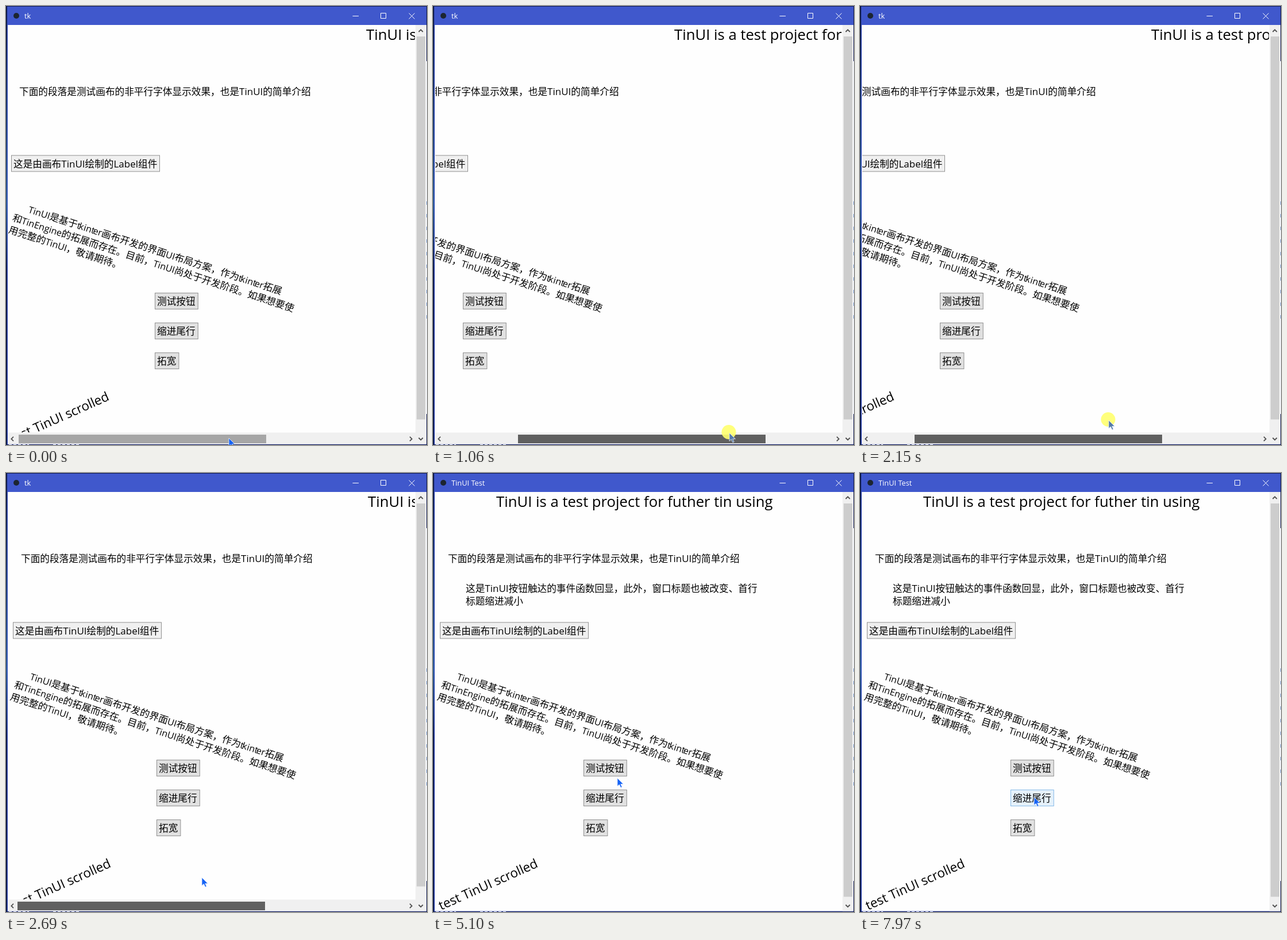
Recreate the animation shown at these times as an HTML page. Size 733 by 764 pixels, loop 8000 ms.

```html
<!DOCTYPE html>
<html lang="zh">
<head>
<meta charset="utf-8">
<title>TinUI Test</title>
<style>
html, body { margin: 0; width: 100%; height: 100%; overflow: hidden; background: #fff; }
svg { display: block; width: 733px; height: 764px; }
text { font-family: "Open Sans", "Noto Sans CJK SC", "Noto Sans CJK", sans-serif; font-size: 16.67px; fill: #000; white-space: pre; }
.latin { font-size: 1.02em; }
.tilt text { font-size: 16.8px; }
.tilt .latin { font-size: .95em; }
#title { font-size: 12.8px; fill: #fff; }
#heading { font-size: 25.7px; }
#slant { font-size: 22.4px; }
.line { fill: none; stroke: #fff; stroke-width: 1; }
.chevron { fill: none; stroke: #505050; stroke-width: 1.8; }
</style>
</head>
<body>
<svg viewBox="0 0 733 764" xmlns="http://www.w3.org/2000/svg">
  <defs>
    <linearGradient id="leftEdge" x2="0" y2="1">
      <stop offset="0" stop-color="#0a1444"/>
      <stop offset=".45" stop-color="#2c5a96"/>
      <stop offset=".6" stop-color="#0c1a4c"/>
    </linearGradient>
    <clipPath id="view"><rect id="viewBox" x="4" y="34" width="708"/></clipPath>
  </defs>
  <rect width="733" height="764" fill="#101a50"/>
  <rect width="2" height="764" fill="url(#leftEdge)"/>
  <rect x="732" y="96" width="1" height="614" fill="#e8ebf2"/>
  <path d="M732.5 340V550" stroke="#6f8fc4" stroke-dasharray="6 16"/>
  <path d="M5 763.5H40M82 763.5H128" stroke="#cfd4e4" stroke-dasharray="5 3"/>
  <rect x="2" y="1" width="730" height="762" fill="#4058cc"/>
  <rect x="3" y="33" width="729" height="729.5" fill="#fefefe"/>
  <circle cx="18" cy="17" r="5" fill="#1c2530"/>
  <text id="title" x="32" y="22"></text>
  <path class="line" d="M603.5 17.5H614M652.5 12.5h9v9h-9zM701.5 12.5l10 10M711.5 12.5l-10 10"/>

  <g clip-path="url(#view)">
    <g id="page">
      <text id="heading" y="59">TinUI is a test project for futher tin using</text>
      <g id="static"></g>
      <g id="echo"></g>
      <g id="tilted" class="tilt" transform="translate(15.1 367.4) rotate(18)"></g>
      <text id="slant" transform="translate(14 761) rotate(-24)">test TinUI scrolled</text>
    </g>
  </g>

  <rect x="713" y="33" width="18.5" height="729.5" fill="#f0f0f0"/>
  <rect id="vThumb" x="715" y="53" width="15" fill="#cdcdcd"/>
  <path class="chevron" d="M718.5 45l3.7-3.7 3.7 3.7M718.5 751.5l3.7 3.7 3.7-3.7"/>
  <g id="hBar">
    <rect x="3" y="742.5" width="710" height="20" fill="#f0f0f0"/>
    <rect id="hThumb" y="746" width="431" height="15"/>
    <path class="chevron" d="M13 749.7l-3.7 3.7 3.7 3.7M703 749.7l3.7 3.7-3.7 3.7"/>
  </g>
  <circle id="halo" r="12.5" fill="#ffff6e" fill-opacity=".9"/>
  <path id="cursor" d="M0 0V14.2L3.4 11.2 5.9 16.6 8.2 15.6 5.8 10.4H10.4Z" stroke="#eef4ff" stroke-width=".8"/>
</svg>
<script>
const NS = 'http://www.w3.org/2000/svg';
const LOOP = 8000;
const LEFT = 20;            // thumb position with the page scrolled fully left
const THUMB_RATIO = .6085;  // thumb travel per pixel of page
const GRAB = 380, RELEASE = 2690, COOL = 2760, CLICK = 3620, ECHO = 3690, WIDEN = 4470;
const $ = id => document.getElementById(id);

function set(el, attrs) {
  for (const k in attrs) el.setAttribute(k, attrs[k]);
  return el;
}

const add = (parent, tag, attrs) => parent.appendChild(set(document.createElementNS(NS, tag), attrs));
const show = (id, on) => { $(id).style.display = on ? '' : 'none'; };

// Latin runs get their own size inside Chinese text.
function mixed(parent, x, y, str) {
  const text = add(parent, 'text', { x, y });
  for (const run of str.match(/[A-Za-z]+|[^A-Za-z]+/g)) {
    const span = add(text, 'tspan', /[A-Za-z]/.test(run) ? { class: 'latin' } : {});
    if (run === 'tkinter') span.setAttribute('dx', '0 -2.2 .2 .2 0 -2.4 0');
    span.textContent = run;
  }
}

function lines(parent, x, y, gap, rows) {
  rows.forEach((row, i) => mixed(parent, x, y + i * gap, row));
}

function box(x, y, w, label, fill) {
  const rect = add($('static'), 'rect', { x: x + .5, y: y + .5, width: w - 1, height: 28, fill, stroke: '#8f8f8f' });
  mixed($('static'), x + 4, y + 21, label);
  return { rect, x, y, w };
}

mixed($('static'), 26, 155.3, '下面的段落是测试画布的非平行字体显示效果，也是TinUI的简单介绍');
box(12, 259.5, 259, '这是由画布TinUI绘制的Label组件', '#f0f0f0');
const buttons = ['测试按钮', '缩进尾行', '拓宽']
  .map((label, i) => box(262, 499 + 52 * i, 9 + 16.7 * label.length, label, '#e1e1e1'));

lines($('echo'), 57, 207.3, 22, [
  '这是TinUI按钮触达的事件函数回显，此外，窗口标题也被改变、首行',
  '标题缩进减小'
]);
mixed($('tilted'), 22, -15.7, 'TinUI是基于tkinter画布开发的界面UI布局方案，作为tkinter拓展');
lines($('tilted'), 0, 6.3, 22, [
  '和TinEngine的拓展而存在。目前，TinUI尚处于开发阶段。如果想要使',
  '用完整的TinUI，敬请期待。'
]);

// Pointer moves, each eased from where the last one ended.
const home = { x: 388, y: 752, thumb: 22 };
const moves = [
  { from: GRAB, to: 1140, steps: 11, x: 519, y: 743, thumb: 151 },
  { from: 1200, to: 1520, steps: 5, x: 561, y: 734, thumb: 201 },
  { from: 1830, to: 2460, steps: 9, x: 342, y: 712, thumb: LEFT },
  { from: RELEASE, to: 3210, steps: 8, x: 315, y: 518 },
  { from: 5100, to: 5570, steps: 7, x: 415, y: 747 },
  { from: 5710, to: 6430, steps: 10, x: 395, y: 738 },
  { from: 6730, to: 6800, steps: 2, x: 409, y: 745 },
  { from: 7130, to: 7970, steps: 12, x: 303, y: 564 }
];

const smooth = u => u * u * (3 - 2 * u);
const mix = (a, b, u) => Math.round(a + (b - a) * u);

// The screen refreshes in discrete steps; the first lands at the start of a move.
function progress(t, { from, to, steps }) {
  const done = Math.floor((t - from) / (to - from) * (steps - 1) + .1) + 1;
  return smooth(Math.min(done / steps, 1));
}

function pose(t) {
  let p = home;
  for (const m of moves) {
    if (t < m.from) break;
    const u = progress(t, m);
    p = { x: mix(p.x, m.x, u), y: mix(p.y, m.y, u), thumb: mix(p.thumb, m.thumb ?? LEFT, u) };
  }
  return p;
}

function draw(t) {
  const { x, y, thumb } = pose(t);
  const dragging = t >= GRAB && t < RELEASE;
  const pressed = dragging || (t >= CLICK && t < ECHO);
  const clicked = t >= ECHO;
  const wide = t >= WIDEN;

  $('title').textContent = clicked ? 'TinUI Test' : 'tk';
  set($('heading'), { x: clicked ? 110 : 630 });
  show('echo', clicked);
  set($('page'), { transform: `translate(${Math.round((LEFT - thumb) / THUMB_RATIO)} 0)` });

  show('hBar', !wide);
  set($('viewBox'), { height: wide ? 728 : 708 });
  set($('vThumb'), { height: wide ? 684.5 : 666.5 });
  set($('hThumb'), { x: thumb, fill: t < GRAB ? '#a6a6a6' : t < COOL ? '#606060' : '#cdcdcd' });

  for (const b of buttons) {
    const over = x >= b.x && x < b.x + b.w && y >= b.y && y < b.y + 29;
    set(b.rect, { fill: over ? '#e5f1fb' : '#e1e1e1', stroke: over ? '#86bbe8' : '#8f8f8f' });
  }

  show('halo', pressed);
  set($('halo'), { cx: x - 1, cy: y - 1.5 });
  set($('cursor'), { transform: `translate(${x} ${y})`, fill: pressed ? '#547aa8' : '#1663f5' });
}

function tick() {
  draw(performance.now() % LOOP);
  requestAnimationFrame(tick);
}
tick();
</script>
</body>
</html>
```
